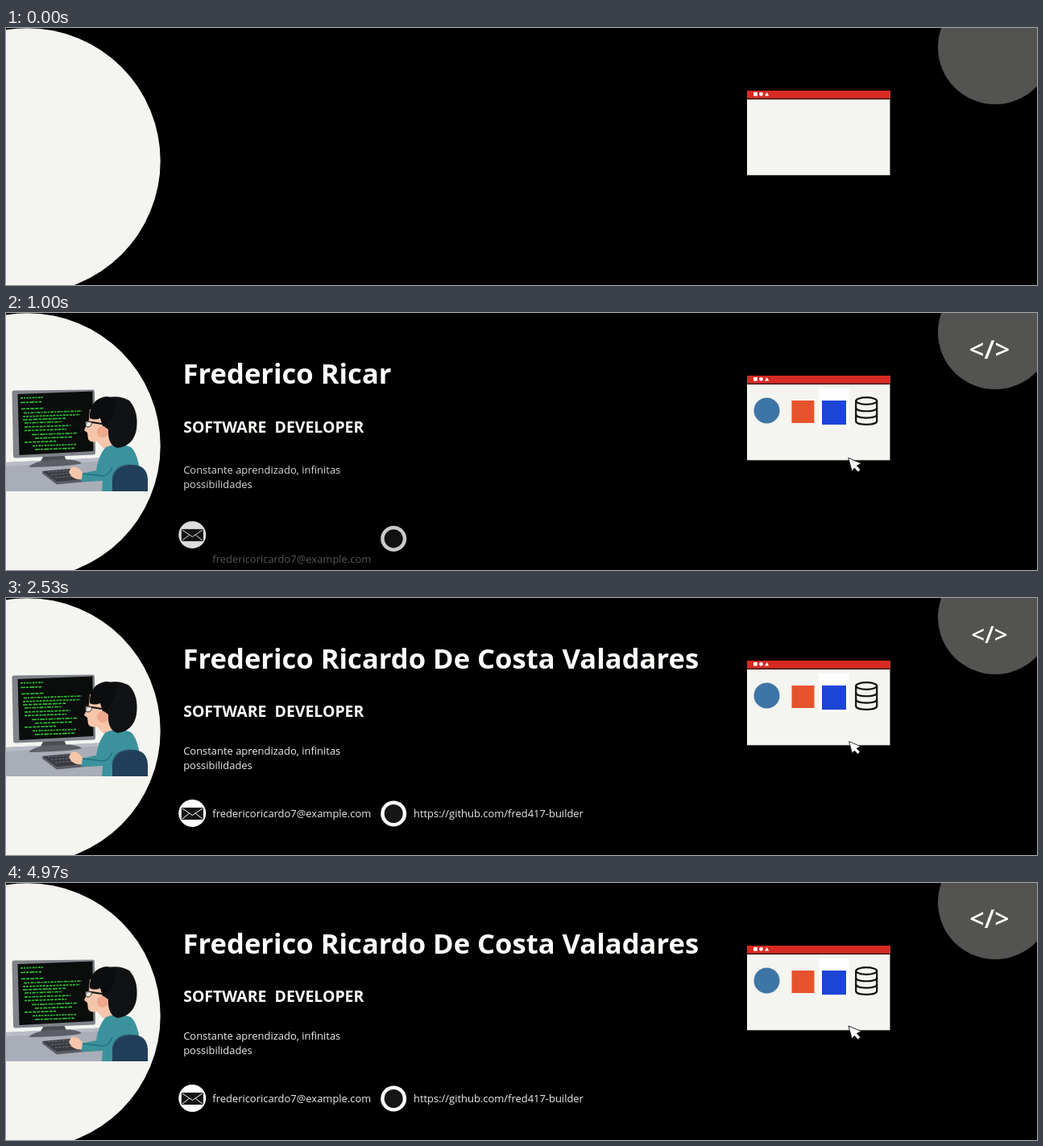
An HTML page for the animation above (5010 ms loop, 1280 by 320 pixels).

```html
<!DOCTYPE html>
<html lang="pt-BR">
<head>
<meta charset="utf-8">
<title>Software developer banner</title>
<style>
  html, body { margin: 0; width: 100%; height: 100%; overflow: hidden; background: #000; }
  svg { display: block; width: 1280px; height: 320px; }
  text { font-family: "Open Sans", "Noto Sans", sans-serif; fill: #fffffc; }
  .bold { font-weight: 700; }
  .small { font-size: 12.95px; fill: #ededed; }
  .line { fill: none; stroke: #111; stroke-width: 2.2; }
</style>
</head>
<body>
<svg viewBox="0 0 1280 320" xmlns="http://www.w3.org/2000/svg">
  <rect width="1280" height="320"/>
  <circle cx="26.5" cy="165.4" r="165.2" fill="#f4f4f1"/>
  <circle cx="1228" cy="24" r="71" fill="#535351"/>

  <!-- desk scene -->
  <g id="desk">
    <path d="M0 186 L126 180 L122 222 H0Z" fill="#a9adb7"/>
    <path d="M0 186 L126 180 V184 L0 191Z" fill="#b9bcc5"/>
    <path d="M47 177 L72 176 L76 187 H42Z" fill="#4b4d53"/>
    <path d="M29 191 Q36 184 60 183 Q88 181 94 187 Q84 191 29 192Z" fill="#5d5f66"/>
    <path d="M10 96.5 L108 95.5 Q110 95.5 110 98 L111 174 Q111 176 109 176.500 L12 180.500 Q9 180.500 9 178 L7.500 99 Q7.500 96.500 10 96.500Z" fill="#7f8289"/>
    <path d="M14.500 101 L107.500 97.500 L108.500 172 L16.500 177Z" fill="#0a0d0b"/>
    <g id="code" stroke="#32c23a" stroke-width="1.6"></g>
    <path d="M45 197 L84 193.500 L110 208 L63 213Z" fill="#3b3c43"/>
    <path d="M45 197 L63 210 L110 206 V209 L63 213.500 L45 200Z" fill="#5c5d65"/>
    <path d="M52 198 L83 195.500 M56 201.500 L89 198.500 M61 205 L96 202" stroke="#6d6f77" stroke-width="1" stroke-dasharray="3 1.500" fill="none"/>
    <path d="M104 120 L103 133 L97 146 L101 149 L102 157 Q105 162 113 160 L126 174 L136 166 L136 118Z" fill="#f6c6ab"/>
    <circle cx="120" cy="148" r="7" fill="#f0a88c"/>
    <path d="M119 222 L120 209 L94 210 Q90 205 93 200 L112 196 Q115 176 124 167 Q140 160 155 167 Q167 177 168 222Z" fill="#3b929c"/>
    <path d="M95 200 L121 203 Q129 201 132 192" fill="none" stroke="#25707d" stroke-width="1.300"/>
    <path d="M95 199 Q88 189 81 192 L78 198 L81 203 Q86 208 94 207Z" fill="#f6c6ab"/>
    <path d="M116 108 Q138 100 153 109 Q165 122 162 145 Q158 166 138 168 Q126 164 127 145 L120 140 Q117 128 116 108Z" fill="#111214"/>
    <path d="M104 126 Q106 107 124 104 Q134 104 137 112 Q132 138 120 141 L117 131 Q110 134 104 131Z" fill="#0c0d0f"/>
    <path d="M97 134.500 L119 138" stroke="#101114" stroke-width="2.200"/>
    <path d="M99 135 Q97 140 101 142 Q106 142 107 136" fill="#fff" fill-opacity=".6" stroke="#222" stroke-width="1"/>
    <path d="M132 222 V207 Q134 190 154 189 Q175 188 176 207 V222Z" fill="#213f59"/>
    <path d="M132 207 Q134 190 154 189" fill="none" stroke="#345876" stroke-width="1.300"/>
  </g>

  <!-- texts -->
  <text id="title" class="bold" x="219.6" y="88" font-size="34.6"></text>
  <text id="role" class="bold" x="220.2" y="147.8" font-size="19.45">SOFTWARE&#160;&#160;DEVELOPER</text>
  <g id="motto">
    <text class="small" x="220.2" y="194.7">Constante aprendizado, infinitas</text>
    <text class="small" x="220.2" y="212.7">possibilidades</text>
  </g>
  <g id="mailIcon">
    <circle cx="231.300" cy="268" r="17" fill="#fff"/>
    <rect x="217.800" y="261" width="27.200" height="15" fill="#141414"/>
    <path d="M218.500 261.800 L231.400 270.500 L244.300 261.800 M218.500 275.300 L227.500 268.300 M244.300 275.300 L235.300 268.300" fill="none" stroke="#fff" stroke-width="1"/>
  </g>
  <text id="mail" class="small" x="256.3" y="273">fredericoricardo7@example.com</text>
  <g id="repoIcon">
    <circle cx="481.200" cy="268.500" r="16" fill="#fff"/>
    <circle cx="481.200" cy="268.500" r="11.500" fill="#161616"/>
  </g>
  <text id="repo" class="small" x="506" y="273">https://github.com/fred417-builder</text>

  <!-- browser window -->
  <rect x="920" y="78" width="177.500" height="105.300" fill="#f4f4f0"/>
  <rect x="920" y="78" width="177.500" height="9.800" fill="#d62a23"/>
  <rect x="920" y="87.500" width="177.500" height="1.500" fill="#3a0d0b"/>
  <g fill="#fff">
    <rect x="928" y="80" width="4.800" height="4.600"/>
    <circle cx="937.500" cy="82.300" r="2.400"/>
    <path d="M944.600 80 L947.200 84.600 H942Z"/>
  </g>
  <circle id="tool1" cx="944.500" cy="121.500" r="16" fill="#3d75a6"/>
  <rect id="tool2" x="975.500" y="109" width="28" height="28" fill="#e5532d"/>
  <g id="tool3">
    <rect x="1009.500" y="94" width="37" height="48" fill="#fff"/>
    <rect x="1013" y="109" width="30" height="30" fill="#1c45d6"/>
  </g>
  <g id="tool4" class="line">
    <ellipse cx="1068.200" cy="109.500" rx="13" ry="4.300"/>
    <path d="M1055.200 109.500 V134.500 C1055.200 140.300 1081.200 140.300 1081.200 134.500 V109.500"/>
    <path d="M1055.200 118 C1055.200 123.700 1081.200 123.700 1081.200 118 M1055.200 126.300 C1055.200 132 1081.200 132 1081.200 126.300"/>
  </g>

  <g id="tag"><text x="0" y="11.400" font-size="32" font-weight="600" text-anchor="middle">&lt;/&gt;</text></g>
  <g id="cursor">
    <path d="M-7.800 -8.700 L8 -2 L2.600 .6 L7 5.400 L3.800 8.400 L-.4 3.600 L-3.500 7.400Z" fill="#fff" stroke="#111" stroke-width=".9"/>
  </g>
</svg>

<script>
const LOOP = 5010, ENTER = 640;
const NAME = "Frederico Ricardo De Costa Valadares";
const $ = id => document.getElementById(id);

// id, start ms, x offset, y offset
const entries = [
  ["desk", 217, 0, 84],
  ["role", 525, 0, 60],
  ["motto", 646, 0, 60],
  ["mailIcon", 690, 0, 60],
  ["repoIcon", 740, 0, 60],
  ["mail", 912, 0, 60],
  ["repo", 995, 0, 60],
  ["tool3", 170, -80, 0],
  ["tool4", 280, -80, 0],
  ["tool1", 357, -80, 0],
  ["tool2", 426, -80, 0]
].map(([id, start, dx, dy]) => ({ el: $(id), start, dx, dy }));

// code lines on the screen: y, left, right
const rows = [
  [106, 18, 47], [111.5, 18, 44], [119.5, 19, 47], [124.500, 22, 94],
  [129, 21, 92], [133, 21, 74], [137, 23, 70], [142, 23, 80],
  [146.500, 23, 75], [151.500, 32, 88], [156, 36, 82], [161, 23, 62],
  [165.500, 33, 87], [170, 36, 85]
];
$("code").innerHTML = rows.map(([y, a, b], i) =>
  `<path d="M${a} ${y} L${b} ${y - (b - a) * 0.035}" stroke-dasharray="${3 + i * 3 % 4} 1 ${2 + i % 3} 1.3"/>`
).join("");

const clamp = u => Math.max(0, Math.min(1, u));
const easeOut = u => 1 - (1 - clamp(u)) ** 3;

function place(el, x, y, scale, opacity) {
  el.setAttribute("transform", `translate(${x} ${y}) scale(${scale})`);
  el.setAttribute("opacity", opacity);
}

function draw(t) {
  for (const { el, start, dx, dy } of entries) {
    const p = easeOut((t - start) / ENTER);
    place(el, dx * (1 - p), dy * (1 - p), 1, p);
  }
  $("title").textContent = NAME.slice(0, Math.max(0, Math.floor((t - 50) / 62)));

  const pulse = 1 - 0.08 * Math.cos((t - 705) / 900 * 2 * Math.PI);
  place($("tag"), 1220.9, 45, pulse, clamp((t - 50) / 250));
  const p = easeOut((t - 590) / ENTER);
  place($("cursor"), 1053.8, 186.700 + 60 * (1 - p), pulse, p);
}

function tick() {
  draw(performance.now() % LOOP);
  requestAnimationFrame(tick);
}
tick();
</script>
</body>
</html>
```
